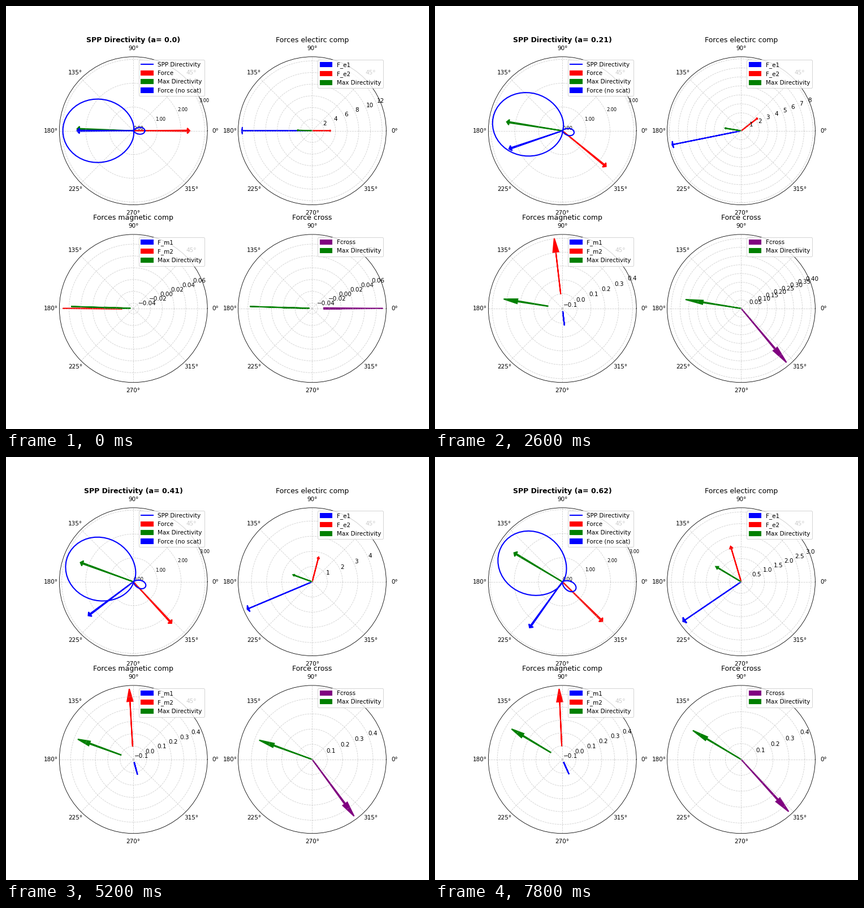
These frames come from a looping animation (748 by 748 pixels, 8000 ms). A matplotlib script:

```python
import numpy as np
import matplotlib.pyplot as plt
from matplotlib.animation import FuncAnimation
from matplotlib.patches import FancyArrow, Patch

FRAMES, INTERVAL = 40, 200
STEP = np.pi / 2 / 99
OFFSET = 0.425      # constant term of the dipole pattern
MARGIN = 0.05
HEAD = 0.1
THIN, THICK = 0.001, 0.02

KNOTS = np.array([0, 4, 9, 16, 26, 33, 39]) * STEP
angles = np.arange(FRAMES) * STEP
theta = np.linspace(0, 2 * np.pi, 100)


def track(*values):
    """Cubic Hermite curve through the knots, sampled at every angle."""
    v = np.array(values, float)
    slope = np.gradient(v, KNOTS, edge_order=2)
    k = np.clip(np.searchsorted(KNOTS, angles, side="right") - 1, 0, len(v) - 2)
    h = KNOTS[k + 1] - KNOTS[k]
    s = (angles - KNOTS[k]) / h
    return ((1 + 2 * s) * (1 - s) ** 2 * v[k] + s * (1 - s) ** 2 * h * slope[k]
            + s * s * (3 - 2 * s) * v[k + 1] + s * s * (s - 1) * h * slope[k + 1])


def polar_track(size, degrees):
    """Follow a vector by its components; returns direction and length."""
    size, rad = np.array(size), np.radians(degrees)
    x, y = track(*(size * np.cos(rad))), track(*(size * np.sin(rad)))
    return np.arctan2(y, x), np.hypot(x, y)


force_dir = np.radians(track(0, -16.4, -31.9, -42.8, -47.3, -46.7, -44.6))
free_dir = np.pi + angles * (1.61 - 0.12 * angles)

e1_dir = np.pi + 0.965 * angles
e1_len = np.exp(track(*np.log([12.1, 11.28, 9.34, 6.88, 4.64, 3.656, 3.03])))
e2_dir = np.radians(track(0, 12.1, 25.6, 46.8, 75.4, 93.1, 106.6))
e2_len = track(3.16, 3.0, 2.62, 2.06, 1.685, 1.59, 1.593)

m1_dir = np.radians(track(-90, -88.2, -85.3, -81.6, -74.8, -69.6, -65.8))
m1_len = track(0, 0.0075, 0.0145, 0.0197, 0.0203, 0.021, 0.0204)
strength = [0.0708, 0.1908, 0.3385, 0.4325, 0.4637, 0.4565, 0.4435]
m2_dir, m2_len = polar_track(strength, [180, 110.3, 99.4, 95.4, 93.35, 92.9, 92.66])
cross_dir, cross_len = polar_track(
    strength, [0, -25.7, -43.9, -52.9, -53.55, -50.75, -47.7])


def directivity(a):
    tilt = np.tan(0.88 * a)
    r = (OFFSET - np.cos(theta) + tilt * np.sin(theta)) ** 2
    return 0.995 * r / (OFFSET ** 2 + (1 + tilt ** 2) / 2)


fig, axs = plt.subplots(2, 2, figsize=(10, 10), dpi=74.8,
                        subplot_kw={"projection": "polar"})
main, electric, magnetic, cross = axs.flat
for ax in axs.flat:
    ax.grid(True, linestyle="--", alpha=0.6)

curve, = main.plot(theta, directivity(0), color="blue", lw=2,
                   label="SPP Directivity")
main.set_yticks([0, 1, 2, 3], ["0.00", "1.00", "2.00", "3.00"], fontsize=8)
electric.set_title("Forces electirc comp")
magnetic.set_title("Forces magnetic comp")
cross.set_title("Force cross")


def add_legend(ax, entries, first=()):
    swatches = [Patch(color=c, lw=2, label=text) for c, text in entries]
    ax.legend(handles=[*first, *swatches], loc="upper right")


best = ("green", "Max Directivity")
add_legend(main, [("red", "Force"), best, ("blue", "Force (no scat)")], [curve])
add_legend(electric, [("blue", "F_e1"), ("red", "F_e2"), best])
add_legend(magnetic, [("blue", "F_m1"), ("red", "F_m2"), best])
add_legend(cross, [("purple", "Fcross"), best])

arrows = []


def draw_arrows(ax, items, top=0):
    """Draw (direction, length, colour, width) arrows and fit the radial range."""
    low = 0
    for direction, size, color, width in items:
        if size < 1e-9:
            continue
        arrow = FancyArrow(direction, 0, 0, size, width=width, head_width=0.1,
                           head_length=HEAD, length_includes_head=True,
                           color=color, lw=2)
        arrows.append(ax.add_patch(arrow))
        low, top = min(low, size - HEAD), max(top, size)
    pad = MARGIN * (top - low)
    ax.set_ylim(low - pad if low < 0 else 0, top + pad)


def update(i):
    while arrows:
        arrows.pop().remove()
    a = angles[i]
    r = directivity(a)
    curve.set_ydata(r)
    peak = r.max()
    best_dir = theta[np.argmax(np.round(r, 9))]
    main.set_title(f"SPP Directivity (a= {round(float(a), 2)})", fontweight="bold")

    def best_arrow(size):
        return best_dir, 0.8 * size, "green", THICK

    draw_arrows(main, [(force_dir[i], 0.8 * peak, "red", THICK),
                       best_arrow(peak),
                       (free_dir[i], 0.8 * peak, "blue", THICK)], peak)
    draw_arrows(electric, [(e1_dir[i], e1_len[i], "blue", THIN),
                           (e2_dir[i], e2_len[i], "red", THIN),
                           best_arrow(e2_len[i])])
    draw_arrows(magnetic, [(m1_dir[i], m1_len[i], "blue", THIN),
                           (m2_dir[i], m2_len[i], "red", THIN),
                           best_arrow(m2_len[i])])
    draw_arrows(cross, [(cross_dir[i], cross_len[i], "purple", THICK),
                        best_arrow(cross_len[i])])
    return []


anim = FuncAnimation(fig, update, frames=FRAMES, interval=INTERVAL,
                     repeat=True, repeat_delay=0)
plt.show()
```
